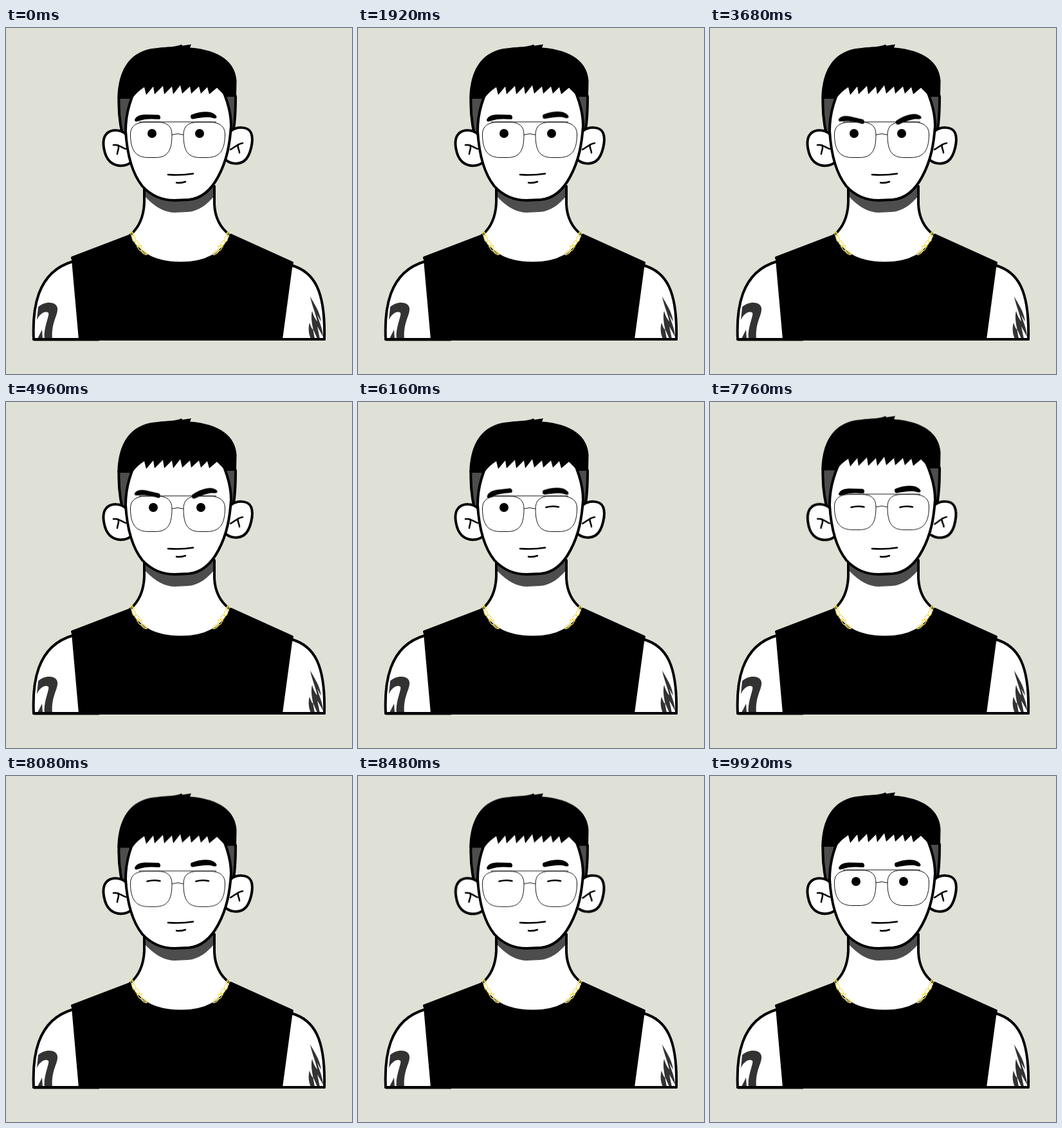
These frames come from a looping animation (538 px wide and 538 px high, 10 s). An HTML page:

```html
<!DOCTYPE html>
<html lang="en">
<head>
<meta charset="utf-8">
<title>Portrait</title>
<style>
html, body { margin: 0; width: 100%; height: 100%; overflow: hidden; background: #dfe0d6; }
svg { display: block; width: 100%; height: 100%; }
.line { stroke: #000; stroke-width: 4; stroke-linecap: round; stroke-linejoin: round; }
.skin { fill: #fff; }
.none { fill: none; }
.mid { stroke-width: 2.5; }
.shade { fill: #4d4d4d; }
.ink { fill: #333; }
.chain { fill: none; stroke: #f0df70; stroke-width: 1.3; }

.brow, .look, .open, .shut, .hair, .glasses, .ear { animation: 10s linear infinite; }
.brow, .look, .hair, .glasses, .ear { animation-timing-function: ease-in-out; }
.brow, .ear { transform-box: fill-box; transform-origin: center; }
.open, .shut { animation-timing-function: step-end; }
.shut { opacity: 0; }
.brow.l { animation-name: brow-l; }
.brow.r { animation-name: brow-r; }
.look { animation-name: look; }
.open.l { animation-name: open-l; }
.open.r { animation-name: open-r; }
.shut.l { animation-name: shut-l; }
.shut.r { animation-name: shut-r; }
.hair { animation-name: bob; }
.glasses { animation-name: slide; }
.ear.l { animation-name: ear-l; }
.ear.r { animation-name: ear-r; }

@keyframes brow-l {
  0%, 4%, 17.6%, 23%, 70%, 100% { transform: none; }
  8%, 13% { transform: translateY(-10px); }
  30%, 52.8% { transform: translateY(3.5px) rotate(12deg); }
  58%, 61.6% { transform: translateY(1.5px) rotate(-8deg); }
}
@keyframes brow-r {
  0%, 4%, 23%, 70%, 100% { transform: none; }
  8%, 13% { transform: translateY(-10px); }
  17.6% { transform: translateY(-.5px); }
  30%, 52.8% { transform: translate(1px, 5px) rotate(-13deg); }
  58%, 61.6% { transform: translateY(3px) rotate(2deg); }
}
@keyframes look {
  0%, 31%, 52%, 100% { transform: none; }
  35%, 40% { transform: translateX(-3px); }
  44%, 48% { transform: translateX(3px); }
}
@keyframes open-l { 0%, 87.2% { opacity: 1; } 68% { opacity: 0; } }
@keyframes open-r { 0%, 87.2% { opacity: 1; } 57.6% { opacity: 0; } }
@keyframes shut-l { 0%, 87.2% { opacity: 0; } 68% { opacity: 1; } }
@keyframes shut-r {
  0%, 87.2% { opacity: 0; }
  57.6% { opacity: 1; transform: translateX(-3px); }
  66% { opacity: 1; transform: none; }
}
@keyframes bob {
  0%, 73.6%, 92%, 100% { transform: none; }
  77% { transform: translateY(-4px); }
  80.8%, 85% { transform: translateY(1.6px); }
}
@keyframes slide {
  0%, 73.6%, 92%, 100% { transform: none; }
  77% { transform: translateY(-3px); }
  80.8%, 85% { transform: translateY(1.6px); }
}
@keyframes ear-l {
  0%, 73.6%, 80.8%, 92%, 100% { transform: none; }
  77%, 86% { transform: rotate(3deg); }
}
@keyframes ear-r {
  0%, 73.6%, 80.8%, 92%, 100% { transform: none; }
  77%, 86% { transform: rotate(-3deg); }
}
</style>
</head>
<body>
<svg viewBox="0 0 538 538">
  <defs>
    <path id="lens" d="M217 146.500H236C251 146.500 258 153 258 166C258 190 252 201.500 232 201.500H222C203 201.500 193.500 192 193.500 165C193.500 153 202 146.500 217 146.500Z"/>
    <g id="links">
      <ellipse rx="2" ry="4" transform="translate(196 320) rotate(-25)"/>
      <ellipse rx="2.400" ry="5" transform="translate(199 328) rotate(-18)"/>
      <ellipse rx="2.400" ry="5" transform="translate(204 335) rotate(-36)"/>
      <ellipse rx="2.400" ry="5" transform="translate(208 342) rotate(-30)"/>
      <ellipse rx="2.200" ry="5" transform="translate(215 349) rotate(-52)"/>
      <path d="M193 317L200 322M203 340L212 339M209 346L219 352"/>
    </g>
  </defs>

  <!-- body -->
  <path class="line skin" d="M43 484C41 440 46 380 104 363L444 369C479 379 497 408 495 484Z"/>
  <path class="ink" d="M50 434C60 424 79 425 80 436C81 447 70 458 72 483H60C58 466 68 447 66 443C62 439 53 443 48 454ZM49 483L56 469L57 483Z"/>
  <path class="ink" d="M473 417C478 428 488 439 490 457L484 446C488 460 492 466 493 480L484 464L488 483H484L477 467L480 483H474C470 475 470 465 472 458C474 465 476 468 478 470C475 458 474 447 476 440C479 450 482 454 484 456C481 442 475 430 473 417Z"/>
  <path class="skin" d="M215 240V272C214 294 206 311 192 322L215 372H325L349 321C334 311 326 296 325 274V240Z"/>
  <path class="shade" d="M215 244V261C229 276 245 287 262 287L283 286C300 285 314 273 324 261V244Z"/>
  <path class="line none" d="M215 246V272C214 294 206 311 193 322M324 246V274C325 296 334 311 347 321"/>
  <path class="line" d="M192 323C204 349 228 365.500 272 365.500C314 365.500 338 349 350 322L445 365L443 373L428 484H115L104 360L103 357Z"/>
  <path class="line none" d="M43 484H495M44 484.500H144"/>
  <g class="chain">
    <use href="#links"/>
    <use href="#links" transform="matrix(-1 0 0 1 541 0)"/>
  </g>

  <!-- head -->
  <g class="hair">
    <path class="shade" d="M175 106H202L192 181H186C180 166 174 140 175 106ZM357 102H334L343 181H350C355 155 357 140 357 102Z"/>
    <path class="line none" d="M175.500 108C174.500 140 180 166 186 180M357 106C357 140 355 155 350 180"/>
  </g>
  <g class="ear l">
    <path class="line skin" d="M187 166C179 157 163 157 156 165C147 175 153 200 162 208C172 217 187 215 194 209"/>
    <path class="line none mid" d="M167 182C175 180 181 187 186 188M174 182C177 187 173 191 173 196"/>
  </g>
  <g class="ear r">
    <path class="line skin" d="M349 161C357 153 376 152 381 163C386 174 380 200 370 207C361 213 349 211 343 206"/>
    <path class="line none mid" d="M368 179C360 180 354 187 349 189M361 181C359 186 363 189 363 194"/>
  </g>
  <path class="line skin" d="M212 72C193 108 186 133 186 160C188 194 196 226 212 246C227 262 245 268 262 268L284 267C305 265 320 250 330 231C344 205 348 180 350 152C350 132 345 108 325 72Z"/>
  <path class="hair" d="M173.500 110C174 75 186 34 236 31C250 29 263 30 273 25.500L274 27.500L288 25.500L286 30.500C333 34 357 54 358.500 82L358 107H342L328 93L316 103L313 92L303 102L300 91L288 102L286 91L274 102L271 89L260 103L258 91L246 103L244 90L231 103L229 91L218 104L215 92C207 97 201 103 196 110Z"/>

  <!-- face -->
  <path class="brow l" d="M200 143C202 137 208 135 216 134.500L237 135C241 136 241 142 238 142C226 141 215 141 205 145C202 146 200 145 200 143Z"/>
  <path class="brow r" d="M288 135C300 130.500 310 129.500 318 131C325 133 328 137 327.500 139C326 142 322 140 318 139C309 138 299 140 291 141.500C287 142 286 137 288 135Z"/>
  <g class="look">
    <circle class="open l" cx="227" cy="164" r="7"/>
    <circle class="open r" cx="301" cy="164" r="7"/>
  </g>
  <path class="line none mid shut l" d="M219.500 163.800Q230 161 239.500 163.300"/>
  <path class="line none mid shut r" d="M295.500 163.800Q305 161 315 163.300"/>
  <g class="glasses none" stroke="#111" stroke-width="1">
    <use href="#lens"/>
    <use href="#lens" transform="matrix(-1 0 0 1 534 0)"/>
    <path d="M207 146H327M258 166Q267 163 276 166"/>
  </g>
  <path class="line none mid" d="M252 228Q272 229.500 291 226.500"/>
  <path class="line none mid" d="M265 240.500Q272 241.500 279 239"/>
</svg>
</body>
</html>
```
